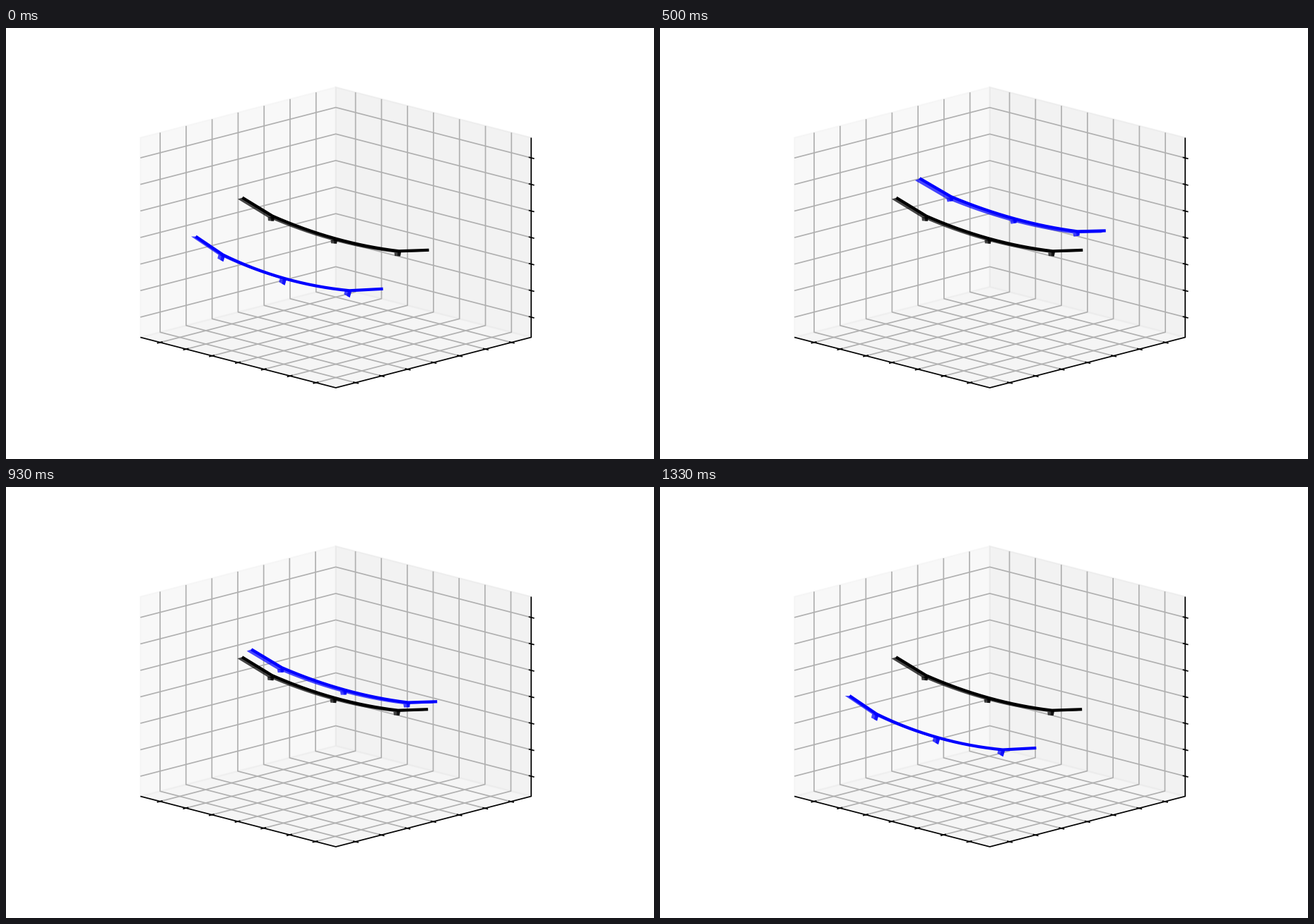
Animation, 917 px wide and 611 px high, one loop 1.36 s. Source, as a matplotlib script:

```python
import numpy as np
import matplotlib.pyplot as plt
from matplotlib.animation import FuncAnimation
from matplotlib.collections import LineCollection
from matplotlib.patches import Polygon

W, H, DPI = 917, 611, 100
LOOP, STEP = 1360, 10
PX = 72 / DPI

# Parallel projection of the box: low corner and its three edges
ORIGIN = np.array([190.2, 438.5])
EDGES = np.array([[276.5, -71.5], [276.5, 71.5], [0, -283]])
TICKS = 0.101 + 0.133 * np.arange(7)

# Beam joints at rest and their travel at full swing
REST = np.array([[334.5, 240.5], [377, 266.5], [466, 298.5],
                 [556, 316.3], [598.5, 314.8]])
SWING = np.array([[66, -55], [70, -55], [72, -56.5], [70, -56], [65, -55]])

fig = plt.figure(figsize=(W / DPI, H / DPI), dpi=DPI, facecolor="white")
ax = fig.add_axes([0, 0, 1, 1])
ax.set_xlim(0, W)
ax.set_ylim(H, 0)
ax.axis("off")


def project(a, b, c):
    return ORIGIN + np.array([a, b, c]) @ EDGES


def add_pane(corners, shade):
    ax.add_patch(Polygon([project(*p) for p in corners], lw=2.1 * PX,
                         fc=(shade,) * 3 + (0.5,), ec=(shade,) * 3 + (0.5,),
                         zorder=0))


def add_lines(color, zorder):
    lines = LineCollection([], colors=color, linewidths=1.7 * PX, zorder=zorder)
    return ax.add_collection(lines, autolim=False)


def grid_lines(ticks):
    paths = []
    for t in ticks:
        paths += [[(t, 1, 0), (t, 0, 0), (t, 0, 1)],
                  [(0, t, 0), (1, t, 0), (1, t, 1)],
                  [(0, 0, t), (1, 0, t), (1, 1, t)]]
    # the two walls meet at a=1, b=0
    return [[project(*p) for p in path] for path in paths]


def tick_marks(ticks):
    a_dir, b_dir = (e / np.hypot(*e) for e in EDGES[:2])
    marks = []
    for t in ticks:
        for spot, out in (((0, t, 0), -a_dir), ((t, 1, 0), b_dir),
                          ((1, 1, t), b_dir)):
            p = project(*spot)
            marks.append([p - 3.6 * out, p + 4.5 * out])
    return marks


class Beam:
    def __init__(self, color):
        self.sides = Polygon(np.zeros((3, 2)), fc=color, alpha=0.72, lw=0)
        self.stubs = [Polygon(np.zeros((3, 2)), fc=color, alpha=0.72, lw=0)
                      for _ in range(6)]
        for patch in [self.sides, *self.stubs]:
            ax.add_patch(patch)
        self.top, = ax.plot([], [], color=color, lw=4.2 * PX,
                            solid_capstyle="butt", solid_joinstyle="round")

    def pose(self, s, scale, zorder):
        joints = ORIGIN + scale * (REST + s * SWING - ORIGIN)
        t = np.linspace(0, 2, 17)
        arc = np.column_stack([np.polyval(np.polyfit([0, 1, 2], v, 2), t)
                               for v in joints[1:4].T])
        edge = np.vstack([joints[:1], arc, joints[4:]])
        width = np.array([-6.5, 2 + 2 * s])
        self.sides.set_xy(np.vstack([edge, (edge + width)[::-1]]))
        self.top.set_data(*edge.T)

        low_left = np.array([-6 + 1.7 * s, 6.7 + 1.5 * s])
        low_right = np.array([2 + 1.5 * s, 7.2 - 2.5 * s])
        high_right = np.array([3, 1])
        low_mid = (low_left + low_right) / 2
        whole = np.array([width, high_right, low_right, low_left])
        half = np.array([(width + high_right) / 2, high_right,
                         low_right, low_mid])
        for i, joint in enumerate(joints[1:4]):
            self.stubs[2 * i].set_xy(joint + whole)
            self.stubs[2 * i + 1].set_xy(joint + half)

        for patch in [self.sides, *self.stubs]:
            patch.set_zorder(zorder)
        self.top.set_zorder(zorder + 0.1)


add_pane([(0, 0, 0), (1, 0, 0), (1, 0, 1), (0, 0, 1)], 0.95)
add_pane([(1, 0, 0), (1, 1, 0), (1, 1, 1), (1, 0, 1)], 0.90)
add_pane([(0, 0, 0), (1, 0, 0), (1, 1, 0), (0, 1, 0)], 0.925)

grid = add_lines("#b0b0b0", 1)
frame_lines = add_lines("black", 2)
frame_lines.set_segments([[project(*p) for p in
                           [(0, 0, 0), (0, 1, 0), (1, 1, 0), (1, 1, 1)]]])
marks = add_lines("black", 2)
still = Beam("black")
moving = Beam("blue")


def draw(n):
    k = int((STEP * n + 4) * 3 / 100)  # picture index at 30 per second
    s = 1 - abs(k - 20) / 10
    # the limits widen slightly as the beam nears its highest point
    scale = 1 - 0.0032 * np.clip((k - 14) / 6, 0, 1)
    grid.set_segments(grid_lines(TICKS * scale))
    marks.set_segments(tick_marks(TICKS * scale))
    still.pose(0, scale, 4)
    moving.pose(s, scale, 3 if s > 0 else 5)


anim = FuncAnimation(fig, draw, frames=LOOP // STEP, interval=STEP,
                     init_func=lambda: draw(0), repeat=True, repeat_delay=0)
plt.show()
```
